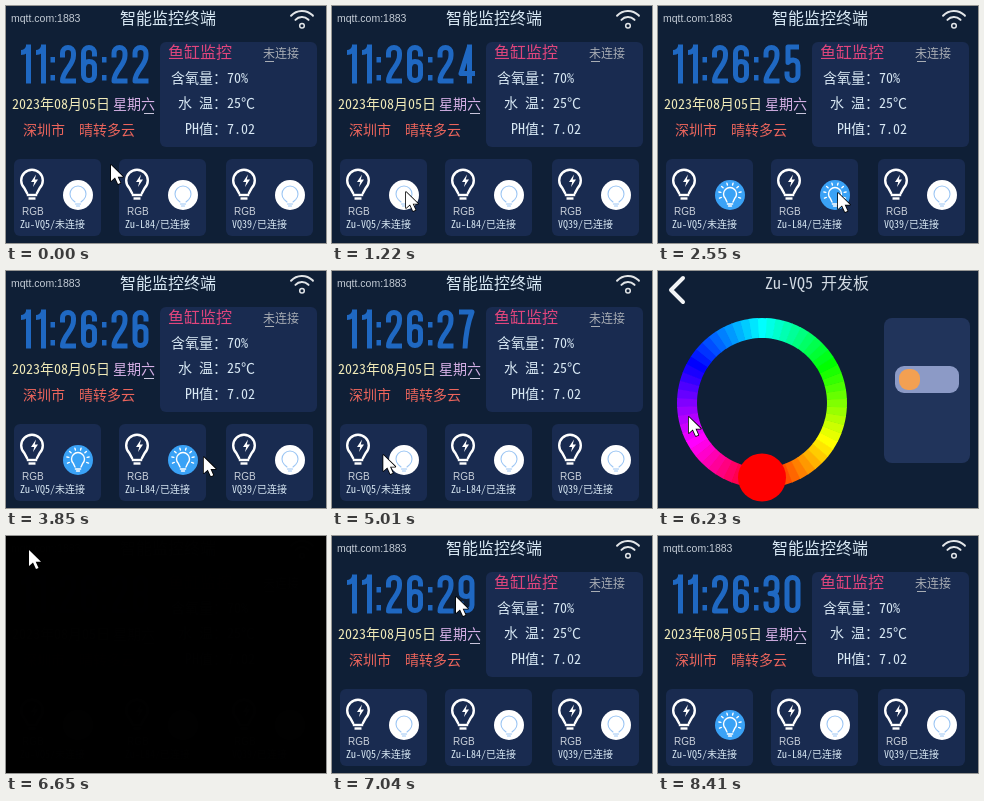
An HTML page with a canvas for the animation above (8510 ms loop, 320x237 px).

```html
<!DOCTYPE html>
<html lang="zh-CN">
<head>
<meta charset="utf-8">
<title>智能监控终端</title>
<style>
html, body { margin: 0; width: 100%; height: 100%; overflow: hidden; background: #0f1f36; }
canvas { display: block; width: 320px; height: 237px; }
</style>
</head>
<body>
<canvas id="stage"></canvas>
<script>
const W = 320, H = 237, LOOP = 8510;
const SLIDE = 5590, SHOWN = 5710, BACK = 6640, FADE = 390;
const CJK = '"Noto Sans Mono CJK SC", "Noto Sans CJK SC", "Noto Sans CJK", sans-serif';
const LATIN = '"Liberation Sans", Arial, sans-serif';
const BG = '#0f1f36', PANEL = '#192b50', LIGHT = '#d8e8f4', BLUE = '#1f68c2';

const canvas = document.getElementById('stage');
const ctx = canvas.getContext('2d');
const dpr = window.devicePixelRatio || 1;
canvas.width = Math.round(W * dpr);
canvas.height = Math.round(H * dpr);

const cards = [
  { x: 8, label: 'Zu-VQ5/未连接', lit: t => t >= 1650 && t < 4860 || t >= 7890 },
  { x: 113, label: 'Zu-L84/已连接', lit: t => t >= 2550 && t < 4270 },
  { x: 220, label: 'VQ39/已连接', lit: t => t >= 3130 && t < 3420 }
];

// Pointer moves: start, end, then where it comes to rest
const moves = [
  [0, 0, 105, 159],
  [150, 850, 74, 186],
  [1780, 2420, 180, 187],
  [2550, 2850, 272, 187],
  [3420, 4020, 180, 186],
  [4270, 4550, 70, 185],
  [4860, 5160, 33, 183],
  [6110, 6510, 23, 14],
  [BACK + 20, 7040, 124, 61],
  [7060, 7490, 71, 181],
  [7890, 8400, 332, 244]
];

// Digit strokes in a 17 x 39 cell, sharing one cap and one bowl
const CAP = 'V8.5a5.5 5.5 0 0 1 11 0', BOWL = 'V30.5a5.5 5.5 0 0 1-11 0';
const digits = [
  `M3 9${CAP}${BOWL}Z`,
  'M8.5 0V39M1 8Q6.5 8 8.5 2',
  `M3 13${CAP}V11Q14 16 9 23Q3 31 3 36.5H16.5`,
  `M3 12${CAP}V14Q14 19 7 19Q14 19 14 24${BOWL}V27`,
  'M11.5 39V0M11.5 2L3 29H17',
  `M15 2.5H4V18Q6 15.5 9 15.5Q14 16 14 21${BOWL}V27`,
  `M3 22.5Q4 17 8.5 17Q14 17 14 22.5${BOWL}${CAP}V12`,
  'M1 2.5H14Q8 18 7 39',
  `M3 9${CAP}V14a5.5 5 0 0 1-11 0ZM3 24a5.5 5 0 0 1 11 0${BOWL}Z`
].map(d => new Path2D(d));
digits[9] = new Path2D();
digits[9].addPath(digits[6], new DOMMatrix([-1, 0, 0, -1, 17, 39]));

const arrow = new Path2D('M0 0V16L4 12.5L7 19L9.5 18L6.7 11.7H12Z');
const bolt = new Path2D('M4-6L-1 1.5H2.2L1 6.5L6-1H2.8Z');

const smooth = u => u * u * (3 - 2 * u);

function pointerAt(t) {
  let x = 0, y = 0;
  for (const [a, b, toX, toY] of moves) {
    if (t < a) break;
    const e = t >= b ? 1 : smooth((t - a) / (b - a));
    x += (toX - x) * e;
    y += (toY - y) * e;
  }
  return [x, y];
}

function text(str, x, y, size, color, font = CJK) {
  ctx.font = `${size}px ${font}`;
  ctx.fillStyle = color;
  ctx.fillText(str, x, y);
}

function rect(x, y, w, h, color) {
  ctx.fillStyle = color;
  ctx.fillRect(x, y, w, h);
}

function box(x, y, w, h, r, color) {
  ctx.fillStyle = color;
  ctx.beginPath();
  ctx.roundRect(x, y, w, h, r);
  ctx.fill();
}

function disc(x, y, r, color) {
  ctx.fillStyle = color;
  ctx.beginPath();
  ctx.arc(x, y, r, 0, Math.PI * 2);
  ctx.fill();
}

function arc(x, y, r, from, to) {
  ctx.beginPath();
  ctx.arc(x, y, r, from, to);
  ctx.stroke();
}

function pen(color, width, cap = 'butt') {
  ctx.strokeStyle = color;
  ctx.lineWidth = width;
  ctx.lineCap = cap;
}

function line(...p) {
  ctx.beginPath();
  for (let i = 0; i < p.length; i += 2) ctx.lineTo(p[i], p[i + 1]);
  ctx.stroke();
}

function at(x, y, draw) {
  ctx.save();
  ctx.translate(x, y);
  draw();
  ctx.restore();
}

function bulb(r, neck, depth) {
  ctx.beginPath();
  ctx.moveTo(-neck, depth);
  ctx.arc(0, 0, r, Math.PI * 0.75, Math.PI * 2.25);
  ctx.lineTo(neck, depth);
  ctx.stroke();
}

function wifi() {
  pen('#e2e5e8', 2, 'round');
  for (const r of [9, 15]) arc(296, 20, r, -Math.PI * 0.76, -Math.PI * 0.24);
  pen('#e2e5e8', 1.5);
  arc(296, 19.7, 2.3, 0, Math.PI * 2);
}

function clock(sec) {
  let x = 12;
  pen(BLUE, 5);
  for (const ch of '11:26:' + sec) {
    if (ch === ':') {
      for (const y of [51, 69]) rect(x + 2.5, y, 4.5, 5.5, BLUE);
      x += 9.5;
    } else {
      at(x + 2, 38.5, () => ctx.stroke(digits[ch]));
      x += ch === '1' ? 15 : 21;
    }
  }
}

function lamp(x, on) {
  disc(x, 189, 15, on ? '#3aa2f6' : '#ffffff');
  at(x, 188, () => {
    pen(on ? '#ffffff' : '#9cc6f4', on ? 1.4 : 1.1, 'round');
    bulb(on ? 6.5 : 8, 3, 8);
    line(-2.6, 10, 2.6, 10);
    line(-1.5, 12, 1.5, 12);
    if (!on) return;
    for (let i = 0; i < 8; i++) {
      const a = Math.PI * (0.88 + i * 0.177), c = Math.cos(a), s = Math.sin(a);
      line(c * 9.3, s * 9.3, c * 11.3, s * 11.3);
    }
  });
}

function card(c, t) {
  box(c.x, 153, 87, 77, 6, PANEL);
  at(c.x + 18, 174.5, () => {
    pen('#ffffff', 2.4);
    bulb(10.8, 4.5, 13.5);
    line(-5.2, 14.5, 5.2, 14.5);
    line(-3.5, 18, 3.5, 18);
    ctx.fillStyle = '#ffffff';
    ctx.fill(bolt);
  });
  text('RGB', c.x + 8, 209, 10, '#c9d0da', LATIN);
  text(c.label, c.x + 6, 222, 10, LIGHT);
  lamp(c.x + 64, c.lit(t));
}

function home(t) {
  rect(0, 0, W, H, BG);
  text('mqtt.com:1883', 5, 16, 10.5, '#c4ccd6', LATIN);
  text('智能监控终端', 114, 18, 16, LIGHT);
  wifi();
  clock(22 + Math.floor((t + 980) / 1100));
  text('2023年08月05日', 6, 103, 14, '#f0eab8');
  text('星期六', 107, 103, 14, '#d6b0e6');
  rect(138, 107, 10, 1, '#c9c5dc');
  text('深圳市　晴转多云', 17, 129, 14, '#ec655c');

  box(154, 36, 157, 105, 6, PANEL);
  text('鱼缸监控', 162, 52, 16, '#e0457c');
  text('未连接', 257, 52, 12, '#a8adb4');
  rect(259, 55, 9, 1, '#a8adb4');
  text('含氧量：70%', 165, 77, 14, LIGHT);
  text('水 温：25℃', 172, 102, 14, LIGHT);
  text('PH值：7.02', 179, 128, 14, LIGHT);
  cards.forEach(c => card(c, t));
}

function detail() {
  rect(0, 0, W, H, BG);
  pen('#f2f4f6', 4, 'round');
  line(25, 7, 13, 19, 25, 31);
  text('Zu-VQ5 开发板', 107, 18, 16, '#d3dbe4');

  const step = Math.PI / 30;
  for (let i = 0; i < 60; i++) {
    const a = Math.PI / 2 - i * step;
    pen(`hsl(${i * 6}, 100%, 50%)`, 20);
    arc(104, 132, 75, a - step * 0.54, a + step * 0.54);
  }
  disc(104, 206.5, 24, '#ff0000');

  box(226, 47, 86, 145, 8, '#21345b');
  box(237, 95, 64, 27, 9, '#8c9ac6');
  box(241, 98, 21, 21, 9, '#f3a052');
}

function pointer(t) {
  at(...pointerAt(t), () => {
    pen('#000000', 1.6);
    ctx.stroke(arrow);
    ctx.fillStyle = '#ffffff';
    ctx.fill(arrow);
  });
}

function render(t) {
  ctx.setTransform(dpr, 0, 0, dpr, 0, 0);
  ctx.lineJoin = 'round';
  if (t < SLIDE || t >= BACK) {
    home(t);
    const dark = t < BACK ? 0 : 1 - (t - BACK - 10) / FADE;
    if (dark > 0) rect(0, 0, W, H, `rgba(0, 0, 0, ${Math.min(1, dark)})`);
  } else {
    const shift = t < SHOWN ? 256 : W;
    at(-shift, 0, () => home(t));
    at(W - shift, 0, detail);
  }
  pointer(t);
}

const start = performance.now();
function loop() {
  render((performance.now() - start) % LOOP);
  requestAnimationFrame(loop);
}
loop();
</script>
</body>
</html>
```
